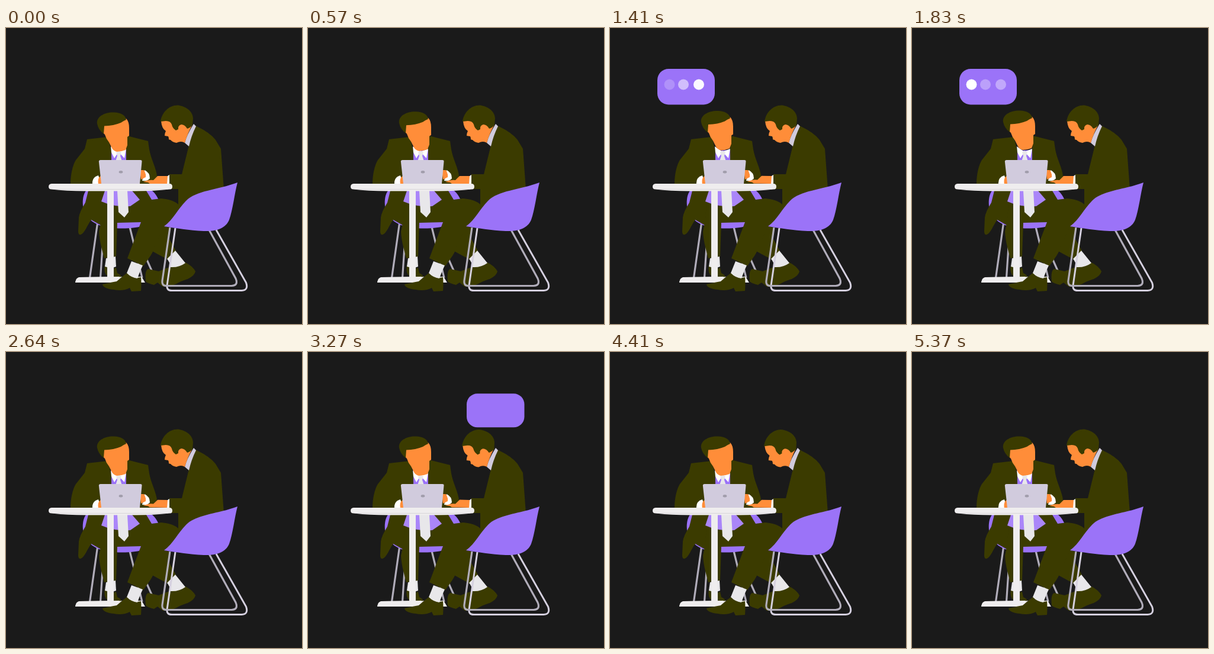
Animation of 500 by 500 pixels, one loop 5.43 s. Source, as an HTML page:

```html
<!DOCTYPE html>
<html lang="en">
<head>
<meta charset="utf-8">
<title>Two men talking at a table</title>
<style>
  html, body { margin: 0; width: 100%; height: 100%; overflow: hidden; background: #1a1a1a; }
  svg { display: block; width: 100vw; height: 100vh; }
  .suit { fill: #3b3b00; }
  .skin { fill: #ff8d39; }
  .violet { fill: #9b73f8; }
  .shirt { fill: #aa86f9; }
  .white { fill: #fff; }
  .table { fill: #efedee; }
  .linen { fill: #e8e7ea; }
  .lilac { fill: #d1cbdd; }
  .rail { fill: none; stroke: #b1adba; stroke-width: 3.2; }
  .far { stroke: #d5d0df; stroke-width: 3; }
</style>
</head>
<body>
<svg viewBox="0 0 500 500">
  <!-- rear chair -->
  <path class="rail" d="M154.500 330L141.500 422M165.500 333L159.500 422M208.500 334L230 422M226 365L248 414"/>
  <path class="violet" d="M138 272C129 279 128 297 132 309C138 324 151 333 169 336C190 340 214 339 229 335L238 290L258 291C254 281 249 276 243 272Z"/>

  <!-- table foot -->
  <path class="table" d="M117 430Q118 422 124 421L229 420L235 430Z"/>

  <!-- seated man, body -->
  <path class="suit" d="M140 275L147 290L160 330L157 344C158 362 163 377 166 389L186 386L188 329L228 328L205 389L232 402C244 386 249 377 248 377L268 337L300 318L291 298C284 291 272 289 262 288L246 290L237 275Z"/>
  <path class="suit" d="M137 188L172 184L178 208L178 264H109C109 246 113 231 118 223L133 204ZM204 182L240 191L242 205C245 222 254 237 255 250L251 264H203V208Z"/>
  <path class="suit" d="M139 275L134 295Q124 311 123 320L122 343Q122 350 126 349C133 347 137 333 144 324L160 333L165 275Z"/>
  <path class="violet" d="M178 207L203 206V225H178Z"/>
  <path class="shirt" d="M167 275L161 293Q172 298 184 300Q199 302 210 301L226 290L213 275Z"/>
  <path class="white" d="M177 200L190 209L203 204L200 220L190 209L183 220L178 210Z"/>
  <path class="linen" d="M186 210L190 207L195 210L193 216L196 225H185L188 216ZM188 275H205L207 311L200 320L190 311Z"/>

  <g id="leftHead">
    <path class="skin" d="M165 163L203 153Q208 158 208 169V182L205 184V198L202 206Q195 209 187 209Q181 207 179 203L174 193Q169 187 167 180L165 178Z"/>
    <path class="suit" d="M165 179Q156 172 154 162C152 149 168 142 182 142.500C194 143 202 147 203 155Q198 157 194 160Q182 165 166 165.500Z"/>
  </g>

  <!-- seated man, feet -->
  <path class="suit" d="M167 401Q176 408 186 405L188 414Q193 416 195 420L173 421Q164 414 167 401Z"/>
  <path class="linen" d="M169 389L185 386L186 403Q178 407 167 403Z"/>

  <!-- leaning man, leg -->
  <path class="suit" d="M267 335L276 337L275 355L287 376L273 391L247 377Z"/>
  <path class="suit" d="M276 404L303 396Q315 402 320 411Q319 418 307 424Q294 428 288 432Q277 437 265 437L256 430L250 434Q238 431 236 428Q234 410 240 407L258 411Q268 407 276 404Z"/>
  <path class="linen" d="M272 390L286 376L303 397Q292 405 278 404Q277 396 272 390Z"/>

  <!-- table -->
  <path class="table" d="M171 274H182V422H171Z"/>
  <path class="table" d="M117 430Q118 422 124 421L192 420L183 430Z"/>
  <path class="suit" d="M204 414L222 422L228 421Q229 434 228 444L212 445L209 439Q198 445 182 442Q164 440 163 433Q175 430 187 428Q196 420 204 414Z"/>
  <path class="linen" d="M212 394L231 401Q226 411 222 423Q212 422 204 414Z"/>

  <!-- leaning man, body -->
  <path class="suit" d="M318 165L322 166Q345 177 354 189L363 204L368 272L291 320V272H276V247H297L309 198Z"/>
  <path class="lilac" d="M317 162L321 166Q313 182 309 200L302 194Q305 181 317 162Z"/>
  <g id="rightHead">
    <path class="skin" d="M262 157L300 154L315 163Q307 177 302 194Q296 190 288 194Q281 193 278 189Q274 189 275 186L274 183L268 182Q268 178 270 174Q263 170 262 157Z"/>
    <path class="suit" d="M261 158C263 143 275 130.500 290 130.500C304 132 316 141 316 153L315 164Q311 169 306 170Q302 163 296 163Q290 165 291 171L287 173Q281 169 280 163Q278 157 270 157Z"/>
  </g>

  <!-- hands and laptop -->
  <g id="hand">
    <path class="skin" d="M232 260Q240 256 249 257L256 250H273V263H243L240 261Z"/>
  </g>
  <path class="white" d="M273 250L276 248V264H272Z"/>
  <path class="white" d="M146 264Q145 252 156 249L161 264Z"/>
  <path class="skin" d="M156 264Q154 253 160 250L164 264Z"/>
  <path class="white" d="M234 240Q243 244 243 254Q240 259 230 258Z"/>
  <path class="skin" d="M226 240L233 240Q237 247 236 252L228 256Z"/>
  <path class="lilac" d="M160 223H227Q230 223 229.500 226L226 263H161L157 227Q156 223 160 223Z"/>
  <ellipse cx="194" cy="243.300" rx="3.300" ry="2.200" fill="#a19dab"/>
  <path class="table" d="M77 263H276Q281 263 281 268T276 272.500Q250 275.500 220 275.500H135Q100 275.500 77 272.500Q72 272.500 72 268T77 263Z"/>
  <path d="M80 272.500H274" stroke="#c9c6cc" stroke-width=".6"/>

  <!-- front chair -->
  <path class="rail far" d="M286 338L272 435Q271 443.500 280 443.500H398Q410 443 405.500 430L355 341"/>
  <path class="rail" d="M277 337L264 427Q263 435.500 271 435.500H381Q393 435 388 423L343 341"/>
  <path class="violet" d="M391 261C386 280 383 308 377 324C371 339 354 344 334 343C309 342 287 338 267 335C283 323 290 306 304 292C322 274 356 274 391 261Z"/>

  <g id="leftBubble">
    <rect class="violet" x="80" width="97" height="60.500" rx="19"/>
    <g class="white"><circle cx="100.500" cy="26.500" r="9"/><circle cx="124" cy="26.500" r="9"/><circle cx="150" cy="26.500" r="9"/></g>
  </g>
  <g id="rightBubble">
    <rect class="violet" x="268" width="97.500" height="57" rx="18"/>
    <g class="white"><circle cx="300" cy="35" r="9"/><circle cx="323" cy="35" r="9"/><circle cx="349" cy="35" r="9"/></g>
  </g>
</svg>
<script>
  const LOOP = 5430, PULSE = 1072;
  const $ = id => document.getElementById(id);
  const ramp = (t, a, b) => Math.min(1, Math.max(0, (t - a) / (b - a)));

  // Eased value through [time, value] pairs
  function track(t, keys) {
    let value = keys[0][1];
    for (let i = 1; i < keys.length; i++) {
      const [a, from] = keys[i - 1], [b, to] = keys[i];
      const p = ramp(t, a, b);
      value += (to - from) * p * p * (3 - 2 * p);
    }
    return value;
  }

  const leftNod = [[330, 0], [900, -3.5], [1350, -2.5], [1830, -3], [2250, -2.5], [2600, 0]];
  const rightTilt = [[2760, 0], [3300, -1.4], [3870, -1], [4350, -1.5], [5100, 0]];
  const leftFloat = [[600, 59], [1350, 69], [1850, 69], [2400, 65.5]];
  const rightFloat = [[2900, 70], [3870, 71], [4350, 71]];

  function bubble(id, t, y, start, end) {
    const g = $(id);
    g.setAttribute('transform', `translate(0 ${y})`);
    g.setAttribute('opacity', ramp(t, start, start + 180) * (1 - ramp(t, end - 150, end)));
    const shown = ramp(t, start + 400, start + 650);
    g.querySelectorAll('circle').forEach((dot, i) => {
      const phase = (t - 1845) / PULSE - i / 3;
      dot.setAttribute('opacity', shown * (.57 + .43 * Math.cos(phase * 2 * Math.PI)));
    });
  }

  function draw(now) {
    const t = now % LOOP;
    $('leftHead').setAttribute('transform', `translate(0 ${track(t, leftNod)})`);
    $('rightHead').setAttribute('transform', `rotate(${track(t, rightTilt)} 305 190)`);
    const tap = 1 - Math.cos(t / LOOP * 18 * Math.PI);
    $('hand').setAttribute('transform', `rotate(${tap * .7} 273 257)`);
    bubble('leftBubble', t, track(t, leftFloat), 600, 2480);
    bubble('rightBubble', t, track(t, rightFloat), 2900, 4370);
    requestAnimationFrame(draw);
  }
  draw(0);
</script>
</body>
</html>
```
